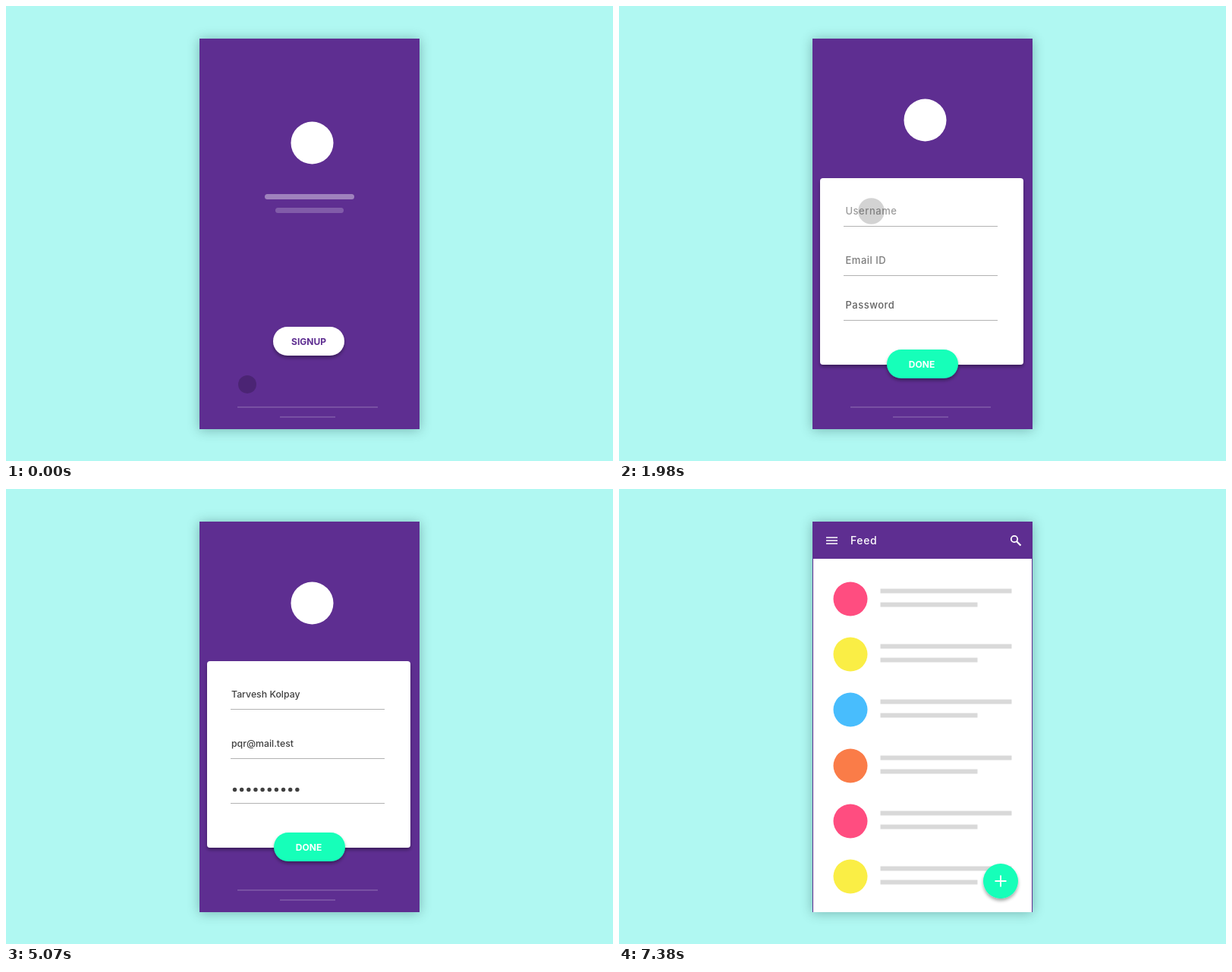
An HTML page for the animation above (7500 ms loop, 800 by 600 pixels).

```html
<!DOCTYPE html>
<html lang="en">
<head>
<meta charset="utf-8">
<title>Signup flow</title>
<style>
  html, body { margin: 0; width: 100%; height: 100%; overflow: hidden; background: #b0f8f2; }
  svg { position: absolute; left: 0; top: 0; font: 500 13px Inter, "Open Sans", sans-serif; }
  #phone { position: absolute; left: 255px; top: 43px; width: 290px; height: 515px;
    background: #5e2e91; box-shadow: 0 1px 15px rgba(0, 50, 50, .33); }
  .hint { letter-spacing: .5px; }
  .typed { font-size: 12.3px; fill: #404040; }
  .label { font-size: 12px; font-weight: 700; text-anchor: middle; }
</style>
</head>
<body>
<div id="phone"></div>
<svg width="800" height="600" viewBox="0 0 800 600">
  <defs>
    <filter id="shadow" x="-20%" y="-20%" width="140%" height="160%">
      <feDropShadow dx="0" dy="3" stdDeviation="2" flood-opacity=".35"/>
    </filter>
    <clipPath id="screen"><rect x="255" y="92" width="290" height="466"/></clipPath>
  </defs>

  <circle id="logo" cx="403.5" cy="180.5" r="28" fill="#fff"/>
  <g id="tagline" fill="#fff">
    <rect x="341" y="248" width="118" height="7" rx="3.5" opacity=".4"/>
    <rect x="355" y="266" width="90" height="7" rx="3.5" opacity=".22"/>
  </g>
  <g fill="#fff" opacity=".16">
    <rect x="305" y="528" width="185" height="2"/>
    <rect x="361" y="541" width="73" height="2"/>
  </g>

  <rect id="card" fill="#fff"/>
  <text id="signup" class="label" x="399" y="447" fill="#5e2e91">SIGNUP</text>

  <g id="form">
    <path d="M296 290.5H499M296 355.5H499M296 414.5H499" stroke="#b2b2b2"/>
    <g class="hint">
      <text id="hint0" x="298.5" y="275" fill="#8a8a8a">Username</text>
      <text id="hint1" x="298.5" y="340" fill="#7c7c7c">Email ID</text>
      <text id="hint2" x="298.5" y="399" fill="#636363">Password</text>
    </g>
    <text id="name" class="typed" x="297" y="275"></text>
    <text id="email" class="typed" x="297" y="340"></text>
    <g id="dots" fill="#404040"></g>
  </g>

  <g id="list" clip-path="url(#screen)"></g>

  <g id="header" fill="#fff">
    <path d="M273 64H288M273 68H288M273 72H288" stroke="#fff" stroke-width="1.7"/>
    <text x="305" y="73" font-size="14" letter-spacing=".6">Feed</text>
    <circle cx="521" cy="66" r="4.2" fill="none" stroke="#fff" stroke-width="1.8"/>
    <path d="M524 69L529.5 74.5" stroke="#fff" stroke-width="2.2"/>
  </g>

  <g id="button">
    <rect id="pill" fill="#14ffb9" filter="url(#shadow)"/>
    <text id="done" class="label" y="4.5" x="-1" fill="#fff">DONE</text>
    <path id="plus" d="M-7.5 0H7.5M0 -7.5V7.5" stroke="#fff" stroke-width="2"/>
  </g>

  <circle id="touch"/>
</svg>
<script>
const LOOP = 7500, STEP = 30;
const el = {};
document.querySelectorAll('[id]').forEach(e => el[e.id] = e);

const NAME = 'Tarvesh Kolpay', EMAIL = 'pqr@mail.test';

// Each touch: time it shows, time its ripple starts, place
const touches = [
  [0, 300, 399, 450],
  [1800, 1950, 332.5, 270.5],
  [2850, 3000, 332.5, 335.5],
  [3930, 4080, 332.5, 395],
  [5250, 5400, 399, 469]
];
const RIPPLE = 210;

const span = (t, a, b) => Math.min(1, Math.max(0, (t - a) / (b - a)));
const ease = p => p < .5 ? 2 * p * p : 1 - 2 * (1 - p) ** 2;
const easeOut = p => 1 - (1 - p) ** 2;
const move = (t, a, b) => ease(span(t, a, b));
const mix = (a, b, p) => a + (b - a) * p;
const typed = (t, start, step) => Math.max(0, Math.floor((t - start) / step) + 1);

function set(e, attrs) {
  for (const k in attrs) e.setAttribute(k, attrs[k]);
}
function add(parent, tag, attrs) {
  const e = document.createElementNS('http://www.w3.org/2000/svg', tag);
  set(e, attrs);
  return parent.appendChild(e);
}

for (let i = 0; i < 10; i++) add(el.dots, 'circle', { cx: 301.5 + i * 9.15, cy: 396.5, r: 2.7 });

const colors = ['#ff4d80', '#faee45', '#48bdfd', '#fa7c48'];
const rows = [145, 218, 291, 365, 438, 511].map((y, i) => {
  const row = add(el.list, 'g', {});
  add(row, 'circle', { cx: 305, cy: y, r: 22.5, fill: colors[i % 4] });
  add(row, 'rect', { x: 344.5, y: y - 13.5, width: 173, height: 6, fill: '#d9d9d9' });
  add(row, 'rect', { x: 344.5, y: y + 4.5, width: 128, height: 6, fill: '#d9d9d9' });
  return row;
});

function box(e, cx, cy, w, h, r) {
  set(e, { x: cx - w / 2, y: cy - h / 2, width: w, height: h, rx: r });
}

function drawCard(t) {
  const grow = move(t, 780, 1217), lift = move(t, 1180, 1380), fill = move(t, 5840, 6190);
  const flat = t >= 5640;
  box(el.card,
    mix(399, 400, fill),
    mix(442 - 70 * grow - 22 * lift, 325, fill),
    mix(mix(94, 268, grow), 288, fill),
    mix(mix(38, 246, grow), 466, fill),
    flat ? 0 : mix(19, 4, grow));
  set(el.card, { filter: flat ? 'none' : 'url(#shadow)' });
}

function drawForm(t, leave) {
  set(el.form, { opacity: span(t, 1350, 1530) * (1 - leave) });
  for (let i = 0; i < 3; i++) {
    const start = touches[i + 1][1];
    set(el['hint' + i], { opacity: 1 - span(t, start, start + RIPPLE) });
  }
  el.name.textContent = NAME.slice(0, typed(t, 2370, 30));
  el.email.textContent = EMAIL.slice(0, typed(t, 3450, 30));
  const n = typed(t, 4500, 63);
  [...el.dots.children].forEach((d, i) => set(d, { opacity: i < n ? 1 : 0 }));
}

function drawButton(t) {
  const shrink = move(t, 5840, 6030), go = move(t, 6000, 6300), swell = move(t, 6810, 7110);
  const size = mix(38, 46, swell);
  set(el.button, {
    opacity: span(t, 1530, 1650),
    transform: `translate(${mix(400, 503, go)} ${mix(472, 517, go)})`
  });
  box(el.pill, 0, 0, mix(94, size, shrink), size, size / 2);
  set(el.done, { opacity: 1 - span(t, 5830, 5940) });
  const p = easeOut(span(t, 6960, 7380));
  set(el.plus, { opacity: p, transform: `rotate(${90 * (p - 1)}) scale(${p})` });
}

function drawFeed(t) {
  const p = span(t, 6280, 6580);
  set(el.header, { opacity: easeOut(p), transform: `translate(0 ${-8 * (1 - p) ** 2})` });
  rows.forEach((row, i) => {
    const q = easeOut(span(t, 6450 + i * 25, 6655 + i * 25));
    set(row, { opacity: q, transform: `translate(0 ${16 * (1 - q)})` });
  });
}

function drawTouch(t) {
  const [show, start, x, y] = touches.filter(c => c[0] <= t).pop();
  const p = span(t, start, start + RIPPLE);
  const slide = show ? 1 : move(t, 150, 330);
  set(el.touch, {
    cx: mix(318, x, slide),
    cy: mix(499, y, slide),
    r: 12 + 24 * Math.sin(p * Math.PI / 2),
    opacity: .2 * (1 - p)
  });
}

function draw(t) {
  const leave = span(t, 5690, 6000);
  set(el.logo, { opacity: 1 - leave, transform: `translate(0 ${-30 * move(t, 780, 1267)})` });
  set(el.tagline, { opacity: 1 - span(t, 780, 930) });
  set(el.signup, { opacity: 1 - span(t, 780, 900) });
  drawCard(t);
  drawForm(t, leave);
  drawButton(t);
  drawFeed(t);
  drawTouch(t);
}

function frame() {
  draw(Math.floor(performance.now() % LOOP / STEP) * STEP);
  requestAnimationFrame(frame);
}
frame();
</script>
</body>
</html>
```
